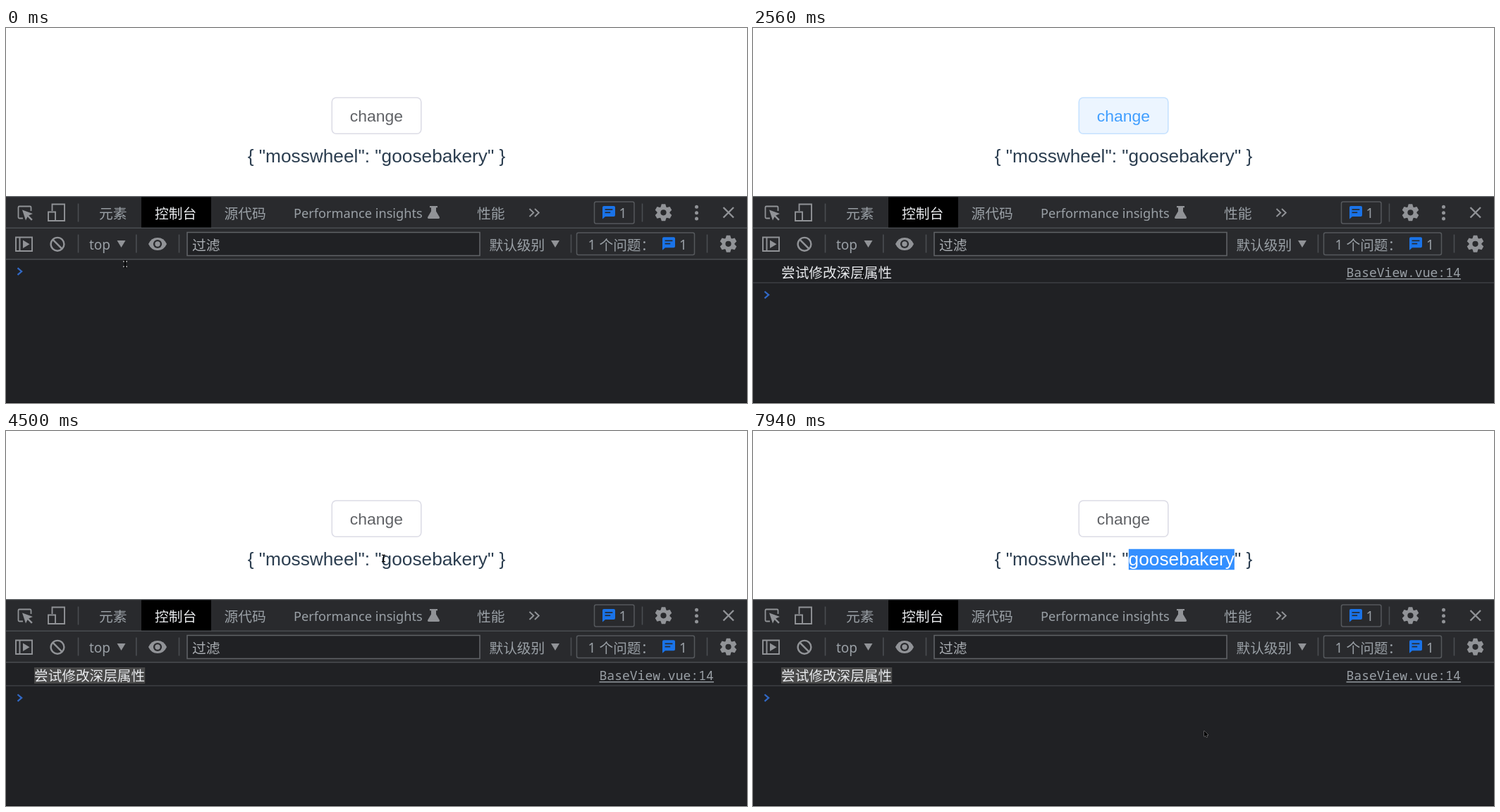
These frames come from a looping animation (1051 px wide and 533 px high, 8 s). An HTML page with a canvas:

```html
<!DOCTYPE html>
<html lang="zh-CN">
<head>
<meta charset="utf-8">
<title>Console demo</title>
<style>
html, body { margin: 0; width: 100%; height: 100%; overflow: hidden; background: #fff; }
canvas { display: block; }
</style>
</head>
<body>
<canvas id="stage" width="1051" height="533"></canvas>
<script>
const ctx = document.getElementById('stage').getContext('2d');
const LOOP = 8000, STEP = 500 / 9;
const UI = '"Noto Sans", "Noto Sans CJK SC", "Noto Sans CJK", sans-serif';
const CJK = '"Noto Sans CJK SC", "Noto Sans CJK", sans-serif';
const ARIAL = '"Liberation Sans", Arial, sans-serif';
const MONO = '"Noto Sans Mono", "DejaVu Sans Mono", monospace';
const GREY = '#9aa0a6', ICON = '#919397', LINE = '#4a4d51', BAR = '#292a2d', DARK = '#202124', BLUE = '#1a73e8';

const LEAD = '{ "mosswheel": "', WORD = 'goosebakery', TAIL = '" }';
const LOG_AT = 1720, PRESS = [1670, 1775], HOVER_AT = 890, ROW_CLICK = 3075, PAGE_CLICK = 4495, DRAG_END = 5550;

// time, x, y of the pointer
const path = [
  [0, 169, 335.5], [280, 270, 285], [560, 440, 200], [690, 466, 168], [830, 430, 136],
  [890, 470, 128], [1060, 531, 108], [1330, 538, 120], [1960, 538, 120],
  [2170, 440, 190], [2390, 240, 300], [2560, 153, 351], [2780, 135, 352],
  [3110, 46, 347], [3170, 48, 347], [3250, 44, 347], [3610, 194, 346],
  [3900, 300, 285], [4220, 500, 190], [4330, 550, 179], [4440, 535, 181], [4560, 536, 181],
  [5280, 694, 186], [5330, 699, 186], [5390, 691, 187], [5560, 687, 186], [5720, 686, 186],
  [5950, 686, 186], [6280, 669, 182], [6670, 669, 182],
  [6900, 712, 205], [7110, 685, 285], [7330, 606, 372], [7500, 640, 411],
  [7610, 641, 419], [7840, 641, 419], [7940, 640, 426], [8000, 640, 426]
];

const clamp = v => Math.max(0, Math.min(1, v));

function pointer(t) {
  const i = Math.max(1, path.findIndex(p => p[0] >= t));
  const [t0, x0, y0] = path[i - 1], [t1, x1, y1] = path[i];
  const k = clamp((t - t0) / (t1 - t0));
  return [x0 + (x1 - x0) * k, y0 + (y1 - y0) * k];
}

function mix(a, b, k) {
  return `rgb(${a.map((v, i) => Math.round(v + (b[i] - v) * k)).join(',')})`;
}

function rect(x, y, w, h, color) {
  ctx.fillStyle = color;
  ctx.fillRect(x, y, w, h);
}

function text(str, x, y, size, color, family = UI, weight = 400) {
  ctx.font = `${weight} ${size}px ${family}`;
  ctx.fillStyle = color;
  ctx.fillText(str, x, y);
}

function fill(d, color = ICON, rule = 'nonzero') {
  ctx.fillStyle = color;
  ctx.fill(new Path2D(d), rule);
}

function stroke(d, color = ICON, width = 2) {
  ctx.strokeStyle = color;
  ctx.lineWidth = width;
  ctx.stroke(new Path2D(d));
}

function box(x, y, w, h, r, line, width, back) {
  ctx.beginPath();
  ctx.roundRect(x, y, w, h, r);
  if (back) { ctx.fillStyle = back; ctx.fill(); }
  ctx.strokeStyle = line;
  ctx.lineWidth = width;
  ctx.stroke();
}

function disc(x, y, r, color) {
  ctx.beginPath();
  ctx.arc(x, y, r, 0, Math.PI * 2);
  ctx.fillStyle = color;
  ctx.fill();
}

function at(x, y, draw) {
  ctx.save();
  ctx.translate(x, y);
  draw();
  ctx.restore();
}

function gear(x, y) {
  at(x, y, () => {
    disc(0, 0, 8.8, ICON);
    for (let i = 0; i < 6; i++) {
      fill('M-4.2 -7 L-2.7 -12 H2.7 L4.2 -7 Z');
      ctx.rotate(Math.PI / 3);
    }
    disc(0, 0, 4.1, BAR);
  });
}

function chat(x, y) {
  at(x, y, () => {
    fill('M2 0 H16 Q18 0 18 2 V13 Q18 15 16 15 H4 L0 18.5 V2 Q0 0 2 0 Z', BLUE);
    rect(3.6, 4.2, 10.8, 1.7, BAR);
    rect(3.6, 8.4, 7.6, 1.7, BAR);
  });
}

const separator = (x, y) => rect(x - 0.8, y, 1.6, 26, LINE);
const caret = (x, y) => fill(`M${x} ${y} h12 l-6 10 Z`);

function tabs() {
  rect(0, 239, 1051, 90, BAR);
  rect(0, 239, 1051, 1.5, LINE);
  rect(0, 283.5, 1051, 1.5, LINE);
  rect(192, 240.5, 99, 43, '#000');

  stroke('M24 270.5 H19 Q17.5 270.5 17.5 269 V255 Q17.5 253.5 19 253.5 H34 Q35.5 253.5 35.5 255 V260', ICON, 1.8);
  fill('M23 258.5 L38 264 L32.2 266.5 L37.8 272 L36 273.7 L30.5 268.2 L28 273.6 Z');
  stroke('M65.5 260 V250.5 H83 V274 H71 M60 261.5 H70 V274 H60 Z', ICON, 1.9);
  separator(102.5, 249.5);

  text('元素', 132, 270.7, 19.8, GREY, CJK);
  text('控制台', 211, 270.7, 19.8, '#e8eaed', CJK);
  text('源代码', 309.5, 270.7, 19.8, GREY, CJK);
  text('Performance insights', 408, 270.3, 18.2, GREY);
  fill('M601 253 H612 V255.2 H610 V260.5 L615 269 Q615.4 271 613.5 271 H599.5 Q597.6 271 598 269 L603 260.5 V255.2 H601 Z');
  text('性能', 668, 270.7, 19.8, GREY, CJK);
  stroke('M742.5 257 l5.8 5.5 l-5.8 5.5 M750 257 l5.8 5.5 l-5.8 5.5', ICON, 1.9);

  box(834.5, 247, 56.5, 31, 2.5, '#55585c', 1.5);
  chat(846, 253);
  text('1', 869.5, 270, 19, GREY);
  separator(902.5, 249.5);
  gear(932.5, 262.3);
  for (const y of [254.3, 262.7, 271]) disc(979.5, y, 2.5, ICON);
  stroke('M1017.5 255 l14.5 14.5 m0 -14.5 l-14.5 14.5', ICON, 2.4);
}

function filterBar() {
  rect(0, 328, 1051, 1.5, LINE);
  stroke('M14 297.5 H37 V317 H14 Z M19.5 297.5 V317', ICON, 1.9);
  fill('M24 301.5 L33.5 307.3 L24 313 Z');
  ctx.beginPath();
  ctx.arc(73, 307.3, 9.4, 0, Math.PI * 2);
  ctx.strokeStyle = ICON;
  ctx.lineWidth = 2.4;
  ctx.stroke();
  stroke('M66.5 300.8 L79.5 313.8', ICON, 2.4);
  separator(102.5, 293.5);
  text('top', 118, 315, 19, GREY);
  caret(157.5, 302);
  separator(184.8, 293.5);

  fill('M202 307 Q206 298 215 298 T228 307 Q224 316 215 316 T202 307 Z');
  disc(215, 307, 6.1, BAR);
  disc(215, 307, 3.7, ICON);
  separator(245.5, 293.5);
  box(257, 290.5, 415, 33, 0, '#5f6266', 1.6, DARK);
  text('过滤', 264, 315.7, 19.8, '#a9adb2', CJK);
  text('默认级别', 685.5, 315.7, 19.7, GREY, CJK);
  caret(773, 302);
  separator(801.5, 293.5);

  box(809.5, 291, 167, 31.5, 2.5, '#55585c', 1.5);
  text('1', 825.5, 315, 19, GREY);
  text('个问题：', 841.5, 315.7, 19.7, GREY, CJK);
  chat(931, 297.3);
  text('1', 955, 315, 19, GREY);
  separator(994.5, 293.5);
  gear(1024.5, 306.8);
}

function consoleView(t, px) {
  rect(0, 329, 1051, 204, DARK);
  rect(0, 532, 1051, 1, '#151618');
  const logged = t >= LOG_AT;
  if (logged) {
    const active = t >= ROW_CLICK && t < PAGE_CLICK;
    if (active) {
      rect(0, 330, 1051, 32, '#29323c');
      rect(0, 329.6, 1051, 1.5, '#4173b8');
    }
    rect(0, 361.3, 1051, 1.5, active ? '#4173b8' : '#3d3f43');
    if (t > 3240) {
      const chars = t < 3600 ? Math.round((px - 40) / 19.65) : 8;
      rect(40, 336, 19.65 * Math.max(0, Math.min(8, chars)), 23, '#484848');
    }
    text('尝试修改深层属性', 40, 354.6, 19.65, '#e8eaed', CJK, 300);
    text('BaseView.vue:14', 841.5, 354, 18.05, GREY, MONO);
    rect(841.5, 356, 162.5, 1.4, GREY);
  }
  const y = logged ? 379.3 : 346;
  stroke(`M16.5 ${y - 4.8} l5.6 4.8 l-5.6 4.8`, '#3168c4', 2.3);
}

function button(t) {
  const hot = clamp((t - HOVER_AT + 30) / 100) * (1 - clamp((t - ROW_CLICK) / 110));
  const pressed = t >= PRESS[0] - 5 && t < PRESS[1];
  const edge = pressed ? '#409eff' : mix([220, 220, 230], [198, 226, 255], hot);
  box(462.3, 99, 126.5, 51.3, 6, edge, 1.6, mix([255, 255, 255], [236, 245, 255], hot));
  text('change', 487.8, 132.5, 22.95, mix([96, 98, 102], [64, 158, 255], hot), ARIAL);
}

function pageText(t, px) {
  const full = LEAD + WORD + TAIL, size = 26.25, base = 191.4;
  ctx.font = `${size}px ${ARIAL}`;
  const width = s => ctx.measureText(s).width;
  const left = 525.5 - width(full) / 2, start = left + width(LEAD);
  text(full, left, base, size, '#2c3e50', ARIAL);
  if (t < PAGE_CLICK) return;

  const reach = WORD + '"';
  let end = start + width(WORD);
  if (t < DRAG_END) {
    end = start;
    for (let n = 1; n <= reach.length; n++) {
      const prev = start + width(reach.slice(0, n - 1)), next = start + width(reach.slice(0, n));
      if (px > (prev + next) / 2) end = next;
    }
  }
  if (end === start) return;
  ctx.save();
  ctx.beginPath();
  ctx.rect(start, 167.5, end - start, 30);
  ctx.clip();
  rect(start, 167.5, end - start, 30, '#338fff');
  text(full, left, base, size, '#fff', ARIAL);
  ctx.restore();
}

function beam(dark) {
  stroke('M-2.5 -4.6 H2.5 M0 -4.6 V4.6 M-2.5 4.6 H2.5', '#000', 1.4);
  if (!dark) return;
  for (const x of [-3, 1.2]) for (const y of [-4.6, 2.8]) rect(x, y, 1.8, 1.8, '#a4a5a6');
}

function arrow() {
  const d = 'M0 0 V8.3 L1.9 6.7 L3.2 9.5 L4.5 8.9 L3.3 6.2 H5.7 Z';
  stroke(d, 'rgba(255,255,255,0.5)', 1);
  fill(d, '#000');
}

function hand() {
  const d = 'M-1 1 Q0 -0.6 1 1 V4.2 L4.5 5 Q5.8 5.5 5.5 7 L4.7 11 H-0.5 L-3.3 7.2 Q-3.5 5.8 -2 6.2 L-1 7 Z';
  stroke(d, 'rgba(255,255,255,0.7)', 1);
  fill(d, '#000');
}

function cursor(t, x, y) {
  const within = (l, r, top, bottom) => x >= l && x <= r && y >= top && y <= bottom;
  const onLog = t >= LOG_AT && within(36, 202, 334, 360);
  const onPrompt = t < LOG_AT && y > 329;
  at(x, y, () => {
    if (within(462, 589, 99, 151)) hand();
    else if (within(343, 710, 167, 198) || onLog) beam(false);
    else if (onPrompt) beam(true);
    else arrow();
  });
}

function frame(now) {
  const t = Math.floor((now % LOOP + 5) / STEP) * STEP;
  const [x, y] = pointer(Math.min(t, LOOP - 1));
  rect(0, 0, 1051, 533, '#fff');
  button(t);
  pageText(t, x);
  consoleView(t, x);
  tabs();
  filterBar();
  cursor(t, x, y);
}

const begin = performance.now();
function tick() {
  frame(performance.now() - begin);
  requestAnimationFrame(tick);
}
tick();
</script>
</body>
</html>
```
